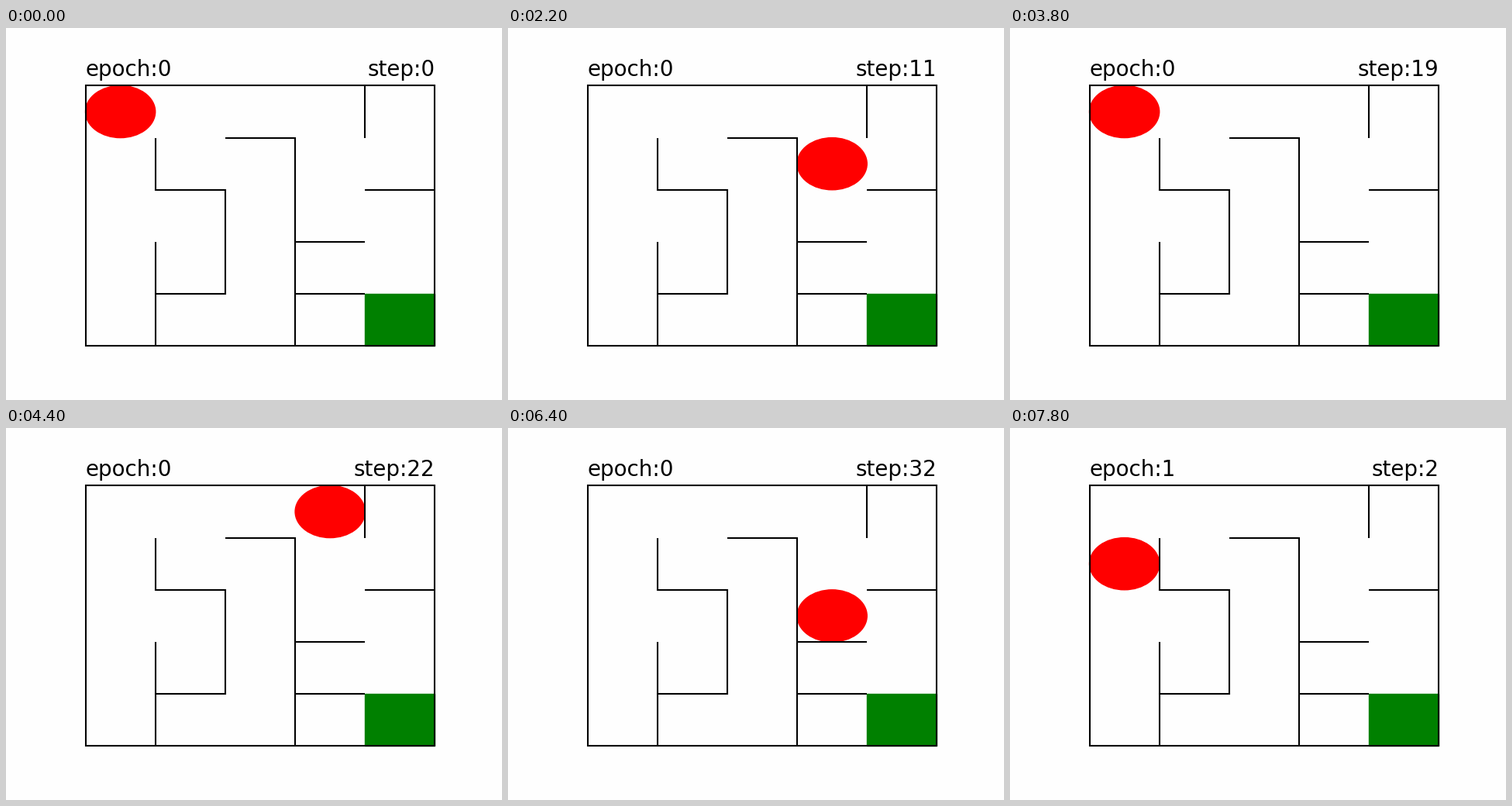
Animation of 640x480 px, one loop 8000 ms. Source, as a matplotlib script:

```python
import matplotlib.pyplot as plt
from matplotlib.animation import FuncAnimation
from matplotlib.patches import Circle, Rectangle

SIZE = 5
STEP_MS = 200
MOVES = {"R": (1, 0), "L": (-1, 0), "U": (0, 1), "D": (0, -1), ".": (0, 0)}

# One walk per epoch; "." is a step without progress.
TO_CORNER = "RR" + "RL" * 2 + "R"
BACK_HOME = "DU" + "D.U" + "LLL" + "DU" * 2
TO_DEAD_END = "RRRDR" + "UD" * 3
RETURN = "LD" + "UULR"
WALKS = [TO_CORNER + BACK_HOME + TO_DEAD_END + RETURN, ".D"]
START, GOAL = (0, 4), (4, 0)

# Inner walls: a grid corner and the way the wall runs from it.
WALLS = [((1, 4), "DRDDL"), ((1, 2), "DD"), ((2, 4), "RDDDD"),
         ((3, 1), "R"), ((3, 2), "R"), ((4, 3), "R"), ((4, 5), "D")]


def trace(start, path):
    """Grid points visited along a path, the start included."""
    points = [start]
    for move in path:
        x, y = points[-1]
        dx, dy = MOVES[move]
        points.append((x + dx, y + dy))
    return points


states = [(epoch, step, cell)
          for epoch, walk in enumerate(WALKS)
          for step, cell in enumerate(trace(START, walk))]

fig, ax = plt.subplots(figsize=(6.4, 4.8), dpi=100, facecolor="#fefefe")
pad = SIZE * 0.05
ax.set_xlim(-pad, SIZE + pad)
ax.set_ylim(-pad, SIZE + pad)
ax.axis("off")

for corner, path in WALLS:
    ax.plot(*zip(*trace(corner, path)), color="black", lw=1.5,
            solid_capstyle="butt", solid_joinstyle="miter")
ax.add_patch(Rectangle((0, 0), SIZE, SIZE, fill=False, lw=1.5, zorder=2))
ax.add_patch(Rectangle(GOAL, 1, 1, color="green"))
ball = ax.add_patch(Circle((0, 0), 0.5, color="red"))
epoch_text = ax.text(0, 5.1, "", size=20, ha="left", va="bottom")
step_text = ax.text(SIZE, 5.1, "", size=20, ha="right", va="bottom")


def update(i):
    epoch, step, (x, y) = states[i]
    ball.center = (x + 0.5, y + 0.5)
    epoch_text.set_text(f"epoch:{epoch}")
    step_text.set_text(f"step:{step}")
    return ball, epoch_text, step_text


anim = FuncAnimation(fig, update, frames=len(states), interval=STEP_MS,
                     repeat=True, repeat_delay=0)
plt.show()
```
